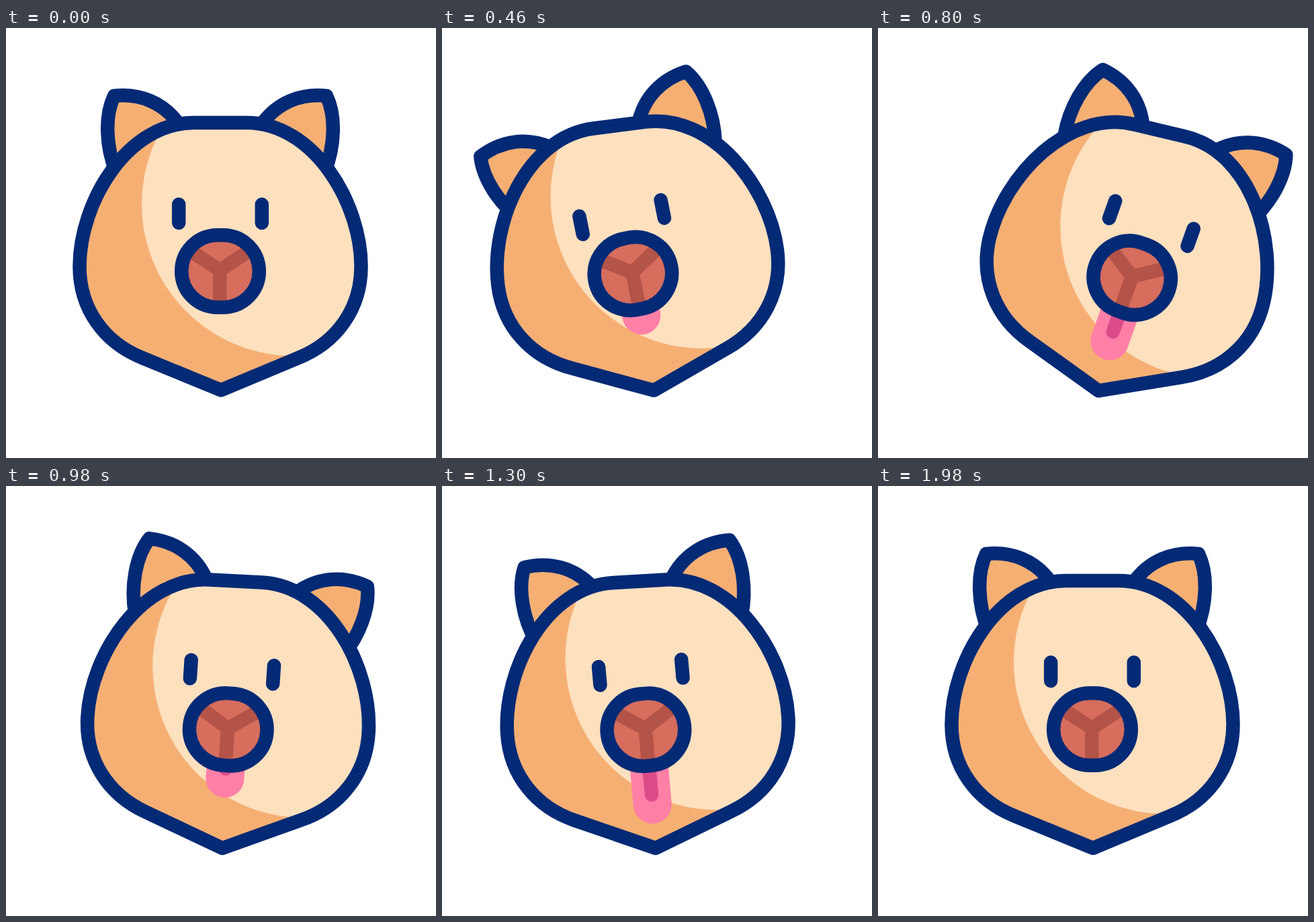
Animation of 640x640 px, one loop 2400 ms. Source, as an HTML page:

```html
<!DOCTYPE html>
<html lang="en">
<head>
<meta charset="utf-8">
<title>Head shake</title>
<style>
  html, body { margin: 0; width: 100%; height: 100%; overflow: hidden; background: #fff; }
  svg { display: block; width: 100vw; height: 100vh; }
  .line { fill: none; stroke: #042a76; stroke-width: 20.5; stroke-linecap: round; stroke-linejoin: round; }
  .ear { fill: #f6af73; }
</style>
</head>
<body>
<svg viewBox="0 0 640 640">
  <defs>
    <path id="skull" d="M280 141H358C458 141 528.5 260 528.5 355C528.5 418 492 468 435 491L320 539L203 491C146 468 109.5 418 109.5 355C109.5 260 180 141 280 141Z"/>
    <path id="ear" d="M180 255L164 215C148 175 147 130 161 101C198 97 234 110 258 144L280 176"/>
    <rect id="snout" x="261.2" y="308.2" width="115.6" height="107.6" rx="53.8"/>
    <clipPath id="inside"><use href="#skull"/></clipPath>
  </defs>

  <g id="head">
    <g id="earL"><use href="#ear" class="line ear"/></g>
    <g id="earR"><use href="#ear" class="line ear" transform="matrix(-1 0 0 1 638 0)"/></g>
    <use href="#skull" fill="#f6af73"/>
    <circle cx="428" cy="262" r="226" fill="#fde0be" clip-path="url(#inside)"/>
    <use href="#skull" class="line"/>
  </g>

  <g id="face">
    <g fill="none" stroke-linecap="round">
      <path id="tongue" stroke="#ff7fa7" stroke-width="57"/>
      <path id="groove" stroke="#dc4b89" stroke-width="20.5"/>
    </g>
    <use href="#snout" fill="#d66d5d"/>
    <path d="M271 329.5L318.3 360.3L365.6 329.5M318.3 360V412" fill="none" stroke="#b45347" stroke-width="20.5"/>
    <use href="#snout" class="line"/>
    <path d="M257.2 262.5V290M380.8 262.5V290" class="line"/>
  </g>
</svg>

<script>
const LOOP = 2400, STEP = 20;

// Every part swings left, right, left, right and back to rest on these beats
const BEATS = [0, 295, 785, 1185, 1440, 1940];
const PANTS = Array.from({ length: 6 }, (_, i) => 200 + 270 * i);
const SETTLE = 1200;

// The ears trail the head by a lag that fades out until SETTLE
const parts = {
  head: { pivot: [320, 575], lag: 0,   swing: [-13.3, 13.4, -8.4, 3.9] },
  face: { pivot: [320, 539], lag: 0,   swing: [-20.3, 19.6, -13.5, 7] },
  earL: { pivot: [277, 257], lag: 190, swing: [-24.5, 19, -11, 5] },
  earR: { pivot: [361, 257], lag: 465, swing: [-25.5, 21, -14, 2.5] }
};
const drops = [39, 78, 48, 88];

// cubic-bezier(.45, 0, .55, 1)
function ease(x) {
  let lo = 0, hi = 1;
  for (let i = 0; i < 24; i++) {
    const s = (lo + hi) / 2, r = 1 - s;
    if (1.35 * s * r * r + 1.65 * s * s * r + s * s * s < x) lo = s; else hi = s;
  }
  return lo * lo * (3 - 2 * lo);
}

// Eases from rest through the peaks, one per beat, and back to rest
function follow(beats, peaks, t) {
  const i = beats.findIndex(b => t < b);
  if (i < 1) return 0;
  const from = peaks[i - 2] || 0, to = peaks[i - 1] || 0;
  return from + (to - from) * ease((t - beats[i - 1]) / (beats[i] - beats[i - 1]));
}

const el = id => document.getElementById(id);

function draw(time) {
  const t = Math.floor((time % LOOP) / STEP) * STEP;
  for (const [id, { pivot, lag, swing }] of Object.entries(parts)) {
    const late = lag * Math.max(0, 1 - t / SETTLE);
    el(id).setAttribute('transform', `rotate(${follow(BEATS, swing, t - late)} ${pivot.join(' ')})`);
  }
  const tip = 415 + follow(PANTS, drops, t);
  el('tongue').setAttribute('d', `M319 372V${tip - 28.5}`);
  el('groove').setAttribute('d', `M319 371V${tip - 43}`);
}

const start = performance.now();
function tick() {
  draw(performance.now() - start);
  requestAnimationFrame(tick);
}
tick();
</script>
</body>
</html>
```
